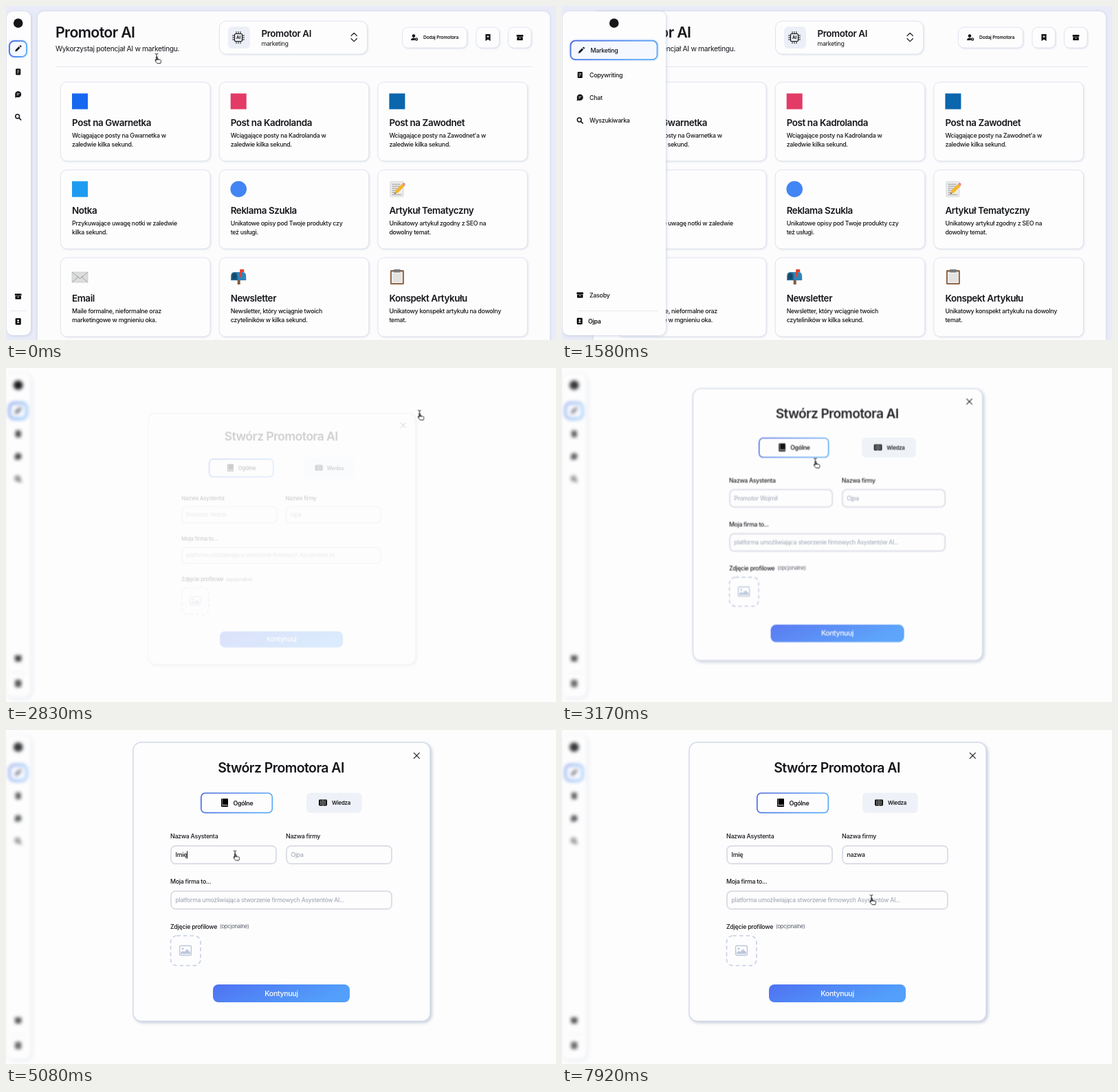
Write an HTML page that moves like this. It is 800 px wide and 487 px high and loops after 8 s.

```html
<!DOCTYPE html>
<html lang="pl">
<head>
<meta charset="utf-8">
<title>Kreator asystenta</title>
<style>
@property --open { syntax: "<number>"; inherits: true; initial-value: 0; }
html, body { margin: 0; width: 100%; height: 100%; overflow: hidden; background: #fdfdfd; }
svg { display: block; width: 100%; height: 100%; }
text { font: 500 8.8px Inter, "Open Sans", sans-serif; letter-spacing: -.03em; fill: #15161a; }
.h1 { font-size: 21.3px; font-weight: 600; }
.h2 { font-size: 19.5px; font-weight: 600; }
.h3 { font-size: 13.4px; font-weight: 600; }
.lead { font-size: 10.3px; font-weight: 400; }
.mid { text-anchor: middle; }
.hint { fill: #9a9fb3; font-weight: 400; }
.line { fill: none; stroke: #15161a; stroke-linecap: round; stroke-linejoin: round; }
.cut { fill: none; stroke: #fff; stroke-width: .8; }
.tile { fill: #fdfdfd; stroke: #e1e4ee; filter: drop-shadow(1px 1.5px 1.2px #b9c0d466); }
.field { fill: #fdfdfd; stroke: #dcdfe7; stroke-width: 2; }

#page, #sidebar, #dialog, #cursor, #cursor > g { animation: 8s linear infinite; }
#page { animation-name: leave; }
@keyframes leave { 0%, 32.2% { opacity: 1; } 35%, 100% { opacity: 0; } }

#sidebar { animation-name: unfold, haze; }
#sidebar .panel { width: calc(35px + 115px * var(--open)); fill: #fdfdfd; filter: drop-shadow(1px 1px 2px #a9b2d088); }
#sidebar .active {
  x: calc(5px + 7.5px * var(--open)); y: calc(51px - .3px * var(--open));
  width: calc(25px + 101px * var(--open)); height: calc(23px + 4.5px * var(--open));
  fill: #f5f8ff; stroke: url(#rim); stroke-width: 1.8; filter: drop-shadow(0 0 1.5px #8db2f5aa);
}
#sidebar .rule { x: calc(7px + 15px * var(--open)); width: calc(23px + 95px * var(--open)); fill: #e6e8f0; }
#sidebar .item { transform: translate(calc(var(--dx) * var(--open)), calc(var(--dy) * var(--open))); }
#sidebar text { opacity: calc(var(--open) * 2 - 1); }
@keyframes unfold {
  0%, 7% { --open: 0; animation-timing-function: ease-out; }
  10.5%, 23.5% { --open: 1; animation-timing-function: ease-in-out; }
  26.5%, 100% { --open: 0; }
}
@keyframes haze {
  0%, 32.2% { filter: blur(0); opacity: 1; }
  35% { filter: blur(2.6px); opacity: 1; }
  39%, 100% { filter: blur(2.8px); opacity: .86; }
}

#dialog { animation-name: rise; transform-origin: 401px 501px; }
#dialog .sheet { fill: #fdfdfe; stroke: #d3dae8; stroke-width: 1.5; filter: drop-shadow(2px 2.5px 2px #a6b0c699); }
@keyframes rise {
  0%, 34.3% { opacity: 0; transform: scale(.885); }
  35.375% { opacity: .19; transform: scale(.9); }
  39.625% { opacity: .93; transform: scale(.975); animation-timing-function: ease-out; }
  42.75%, 100% { opacity: 1; transform: none; }
}

#cursor { animation-name: roam; }
@keyframes roam {
  0%, 1% { transform: translate(219px, 74px); }
  7.5% { transform: translate(24px, 120px); }
  12% { transform: translate(12px, 150px); }
  16%, 21.9% { transform: translate(-20px, 150px); }
  23.8% { transform: translate(60px, 95px); }
  30.4%, 32.2% { transform: translate(622px, 49px); }
  35.375% { transform: translate(602px, 66px); }
  39.625% { transform: translate(368.5px, 136px); }
  43.5%, 68.75% { transform: translate(333px, 180.5px); }
  75.5%, 95.87% { transform: translate(486px, 182px); }
  99%, 100% { transform: translate(450px, 245px); }
}
#cursor > g { animation-timing-function: step-end; }
#arrow { animation-name: arrow; }
#hand { animation-name: hand; }
#beam { animation-name: beam; }
@keyframes arrow { 0%, 37.5% { opacity: 1; } 29.1%, 42.5%, 100% { opacity: 0; } }
@keyframes hand { 0%, 37.5%, 100% { opacity: 0; } 29.1% { opacity: 1; } }
@keyframes beam { 0%, 55%, 81% { opacity: 0; } 42.5%, 68.75%, 95.87%, 100% { opacity: 1; } }
</style>
</head>
<body>
<svg id="stage" viewBox="0 0 800 487"></svg>
<script>
const INK = '#15161a';
const text = (x, y, s, cls = '', attrs = '') => `<text x="${x}" y="${y}" class="${cls}" ${attrs}>${s}</text>`;
const box = (x, y, w, h, r, cls = '', attrs = '') =>
  `<rect x="${x}" y="${y}" width="${w}" height="${h}" rx="${r}" class="${cls}" ${attrs}/>`;
const at = (x, y, s) => `<g transform="translate(${x} ${y})">${s}</g>`;
const fill = (color, d) => `<path d="${d}" fill="${color}"/>`;
const dot = (x, y, r, color = INK) => `<circle cx="${x}" cy="${y}" r="${r}" fill="${color}"/>`;
const stroke = (d, width = 1.2, cls = 'line') => `<path d="${d}" class="${cls}" style="stroke-width:${width}"/>`;

// Icons are centred on 0,0.
const icon = {
  mark: dot(0, 0, 6.8),
  pencil: fill(INK, 'M-4.5 4.5l.8-2.8L.9-2.9l2 2-4.6 4.6zM1.7-3.7l.9-.9q.7-.5 1.3.1l.7.7q.5.6 0 1.2l-.9.9z'),
  doc: box(-3.5, -4.5, 7, 9, 1) + stroke('M-1.8-2h3.6M-1.8 0h3.6M-1.8 2h2', .8, 'cut'),
  chat: dot(0, -.3, 4.5) + fill(INK, 'M-4 0l-.6 4.8L0 3.5z') + stroke('M-2-1.3h4M-2 .6h2.5', .8, 'cut'),
  search: stroke('M1.3 1.3L4 4', 1.7) + '<circle cx="-1" cy="-1" r="2.9" class="line" stroke-width="1.5"/>',
  archive: box(-4.8, -4, 9.6, 2.7, .5) + box(-4.2, -.8, 8.4, 4.9, .7) + stroke('M-1.4 1h2.8', .9, 'cut'),
  contact: box(-4, -4.8, 8, 9.6, 1.2) + dot(0, -1.3, 1.4, '#fff') + fill('#fff', 'M-2.3 2.2q2.3-3.4 4.6 0z'),
  bookmark: fill(INK, 'M-3.6-5h7.2V5L0 2.7-3.6 5z') + stroke('M0-2.8v3M-1.5-1.3h3', 1, 'cut'),
  user: dot(-1, -2.4, 2.3) + fill(INK, 'M-5 4q0-3.6 4-3.6L1 1 .5 4z') +
    '<circle cx="3" cy="2.4" r="1.5" class="line" stroke-width="1.4"/>',
  chip: '<rect x="-5.5" y="-5.5" width="11" height="11" rx="1.6" class="line" stroke-width="1.2"/>' +
    [-3, 0, 3].map(i => stroke(`M${i}-5.5v-3M${i} 5.5v3M-5.5 ${i}h-3M5.5 ${i}h3`, 1)).join('') +
    text(0, 2.2, 'AI', 'mid', 'style="font-size:6.2px;font-weight:700"'),
  book: box(-5, -6, 10, 12, 1) + stroke('M-4 3.6h8.5', .9, 'cut') + stroke('M-3.3-6v9', .5, 'cut'),
  open: box(-6, -4.5, 12, 9, 1.4) + stroke('M0-4v8.5M-4.4-2.2h3M-4.4 0h3M-4.4 2.2h3M1.4-2.2h3M1.4 0h3M1.4 2.2h3', .8, 'cut'),
  image: '<rect x="-8.4" y="-7" width="16.8" height="14" rx="2" fill="none" stroke="#bcc6dc" stroke-width="1.4"/>' +
    dot(-4, -2.8, 1.5, '#bcc6dc') + fill('#bcc6dc', 'M-7 5v-2l3-2.5 2 1.6L2.5-2 7 2.5V5z'),
  memo: box(-10, -11, 19, 22, 1, '', 'fill="#edeeec" stroke="#c9cbca" stroke-width=".7"') +
    stroke('M-7-7H5M-7-4H6M-7-1H3M-7 2H0M-7 5h5M-7 8H6', 1, 'line" stroke-dasharray="3 1" opacity=".45') +
    fill('#f5b52d', 'M-4 7l1.5-5L7-7.5l3.5 3.5L1 5.500z') + fill('#e88d86', 'M7-7.500l1.600-1.500q2-.6 3 1.200.6 1.400-1.100 3.800z') +
    fill('#4a4038', 'M-4 7l.6-2.200 1.600 1.600z'),
  envelope: box(-11.5, -7, 23, 15, 1, '', 'fill="#dcdddd" stroke="#c2c3c4" stroke-width=".7"') +
    stroke('M-11 7.500L-2.500 0M11 7.500L2.500 0M-11-6.500L0 2.500 11-6.500', 1, 'line" opacity=".3'),
  mailbox: box(-1.5, 4, 4, 7, 0, '', 'fill="#8a5939"') +
    fill('#3384b8', 'M-5-7H6q5 0 5 6v6H-5z') + fill('#23648f', 'M-11 5v-6q0-6 5-6t5 6v6z') +
    fill('#174767', 'M-9 3v-4q0-4 3-4t3 4v4z') + fill('#e3402f', 'M2-11h6v4H4v7H2z'),
  clipboard: box(-10, -10, 20, 21, 1.5, '', 'fill="#8f6547"') + box(-8, -7.5, 16, 16.5, .5, '', 'fill="#eeeeec"') +
    stroke('M-6-3H6M-6 0H6M-6 3H6M-6 6H6', .6, 'line" opacity=".25') + box(-5, -11, 10, 4.5, 1, '', 'fill="#777b7e"'),
};
const square = color => box(-11.5, -11.5, 23, 23, 0, '', `fill="${color}"`);

const cards = [
  [square('#1768f0'), 'Post na Gwarnetka', 'Wciągające posty na Gwarnetka w', 'zaledwie kilka sekund.'],
  [square('#e33a66'), 'Post na Kadrolanda', 'Wciągające posty na Kadrolanda w', 'zaledwie kilka sekund.'],
  [square('#0a66ad'), 'Post na Zawodnet', "Wciągające posty na Zawodnet'a w", 'zaledwie kilka sekund.'],
  [square('#1d9bf0'), 'Notka', 'Przykuwające uwagę notki w zaledwie', 'kilka sekund.'],
  [dot(0, 0, 11.8, '#4285f4'), 'Reklama Szukla', 'Unikatowe opisy pod Twoje produkty czy', 'też usługi.'],
  [icon.memo, 'Artykuł Tematyczny', 'Unikatowy artykuł zgodny z SEO na', 'dowolny temat.'],
  [icon.envelope, 'Email', 'Maile formalne, nieformalne oraz', 'marketingowe w mgnieniu oka.'],
  [icon.mailbox, 'Newsletter', 'Newsletter, który wciągnie twoich', 'czyteliników w kilka sekund.'],
  [icon.clipboard, 'Konspekt Artykułu', 'Unikatowy konspekt artykułu na dowolny', 'temat.'],
].map(([art, title, first, second], i) => at(79.5 + i % 3 * 230.7, 111 + Math.floor(i / 3) * 128,
  box(0, 0, 217.5, 115, 9, 'tile') + at(28, 28, art) +
  text(16.5, 64, title, 'h3') + text(16.5, 80.7, first) + text(16.5, 94, second))).join('');

const page = box(0, 0, 800, 487, 0, '', 'fill="#e9ecf8"') +
  box(46, 8, 745, 500, 9, '', 'fill="#fcfcfd" style="filter:drop-shadow(0 0 2px #a9b2d077)"') +
  text(72, 46, 'Promotor AI', 'h1') + text(72, 65.5, 'Wykorzystaj potencjał AI w marketingu.', 'lead') +
  box(310.5, 22, 215, 48, 10, 'tile') + box(323, 30, 32, 32, 6, '', 'fill="#eceff7"') + at(338, 46, icon.chip) +
  text(371.5, 44.5, 'Promotor AI', 'h3') + text(371.5, 57.5, 'marketing', '', 'style="font-weight:400"') +
  stroke('M502 43.500l4.200-4.200 4.200 4.200M502 47.500l4.200 4.200 4.200-4.200', 1.1) +
  box(576.5, 31, 94, 30, 8, 'tile') + at(594, 46, icon.user) +
  text(607, 48.3, 'Dodaj Promotora', '', 'style="font-size:6.7px;font-weight:600"') +
  box(684, 31, 33.5, 30, 8, 'tile') + at(701, 46, icon.bookmark) +
  box(730.5, 31, 33.5, 30, 8, 'tile') + at(747.5, 46, icon.archive) +
  box(72, 88, 693, 1, 0, '', 'fill="#e3e6f0"') + cards;

// icon, collapsed y, shift when unfolded, label
const menu = [
  ['mark', 25, 58, 0, ''], ['pencil', 62, 10.5, 2.5, 'Marketing'], ['doc', 96, 8.5, 4.5, 'Copywriting'],
  ['chat', 129, 8.5, 4.5, 'Chat'], ['search', 162, 8.5, 5, 'Wyszukiwarka'],
  ['archive', 423.5, 8.5, -2, 'Zasoby'], ['contact', 460, 8, -.5, 'Ojpa'],
].map(([name, y, dx, dy, label]) =>
  `<g class="item" style="--dx:${dx}px;--dy:${dy}px">${at(17.7, y, icon[name])}</g>` +
  text(name === 'pencil' ? 41.5 : name === 'contact' ? 38 : 40, y + dy + 3.2, label, '',
    name === 'contact' ? 'style="font-weight:600"' : '')).join('');
const sidebar = box(1, 8, 35, 472, 9, 'panel') + box(5, 51, 25, 23, 7, 'active') + box(7, 444, 23, 1, 0, 'rule') + menu;

const dialog = box(185, 18, 432, 406.5, 12, 'sheet') + stroke('M593.300 33.300l8 8M601.300 33.300l-8 8', 1.1) +
  text(400, 62, 'Stwórz Promotora AI', 'h2 mid') +
  box(283.8, 92, 103.5, 28.7, 6, '', 'fill="#fdfdfe" stroke="url(#rim)" stroke-width="1.7"') + at(318, 106, icon.book) +
  text(330.5, 109.5, 'Ogólne', '', 'style="font-weight:600"') +
  box(437, 91.5, 80.5, 29.5, 6, '', 'fill="#eef1f7"') + at(461, 106, icon.open) +
  text(474, 109.2, 'Wiedza', '', 'style="font-size:7.8px;font-weight:600"') +
  text(239, 158.3, 'Nazwa Asystenta') + text(407, 158.3, 'Nazwa firmy') + text(239, 224, 'Moja firma to...') +
  box(240, 169, 153, 26, 6.5, 'field') + box(408, 169, 153, 26, 6.5, 'field') + box(240, 235, 321, 26, 6.5, 'field') +
  text(246.5, 185.3, '', '', 'id="name"') + text(414.5, 185.3, '', '', 'id="firm"') +
  text(246.5, 251.2, 'platforma umożliwiająca stworzenie firmowych Asystentów AI...', 'hint', 'style="font-size:8.7px"') +
  box(0, 176.5, .9, 11, 0, '', 'id="caret"') +
  text(239, 289.6, 'Zdjęcie profilowe') +
  text(311, 289.3, '(opcjonalne)', '', 'style="font-size:7.7px;font-weight:400;fill:#555a66"') +
  box(239.5, 300, 43.5, 43.5, 9, '', 'fill="none" stroke="#c5cee2" stroke-width="1.6" stroke-dasharray="5.5 4"') +
  at(261, 321.5, icon.image) + box(301, 371, 199, 26, 8, '', 'fill="url(#blue)"') +
  text(400.5, 387.6, 'Kontynuuj', 'mid', 'style="font-size:10.600px;fill:#fff"');

const cursor =
  `<g id="arrow"><path d="M0 0v9l2.100-1.900 1.400 3.200 1.400-.6-1.400-3.100h2.900z" fill="#111" stroke="#fff" stroke-width=".6"/></g>
  <g id="hand"><path d="M-.5 1q0-1.200.9-1.200t1 1.200v2.600l4 .9q1.400.4 1.100 1.800l-.7 3.400H1L-1.800 6.500q-.6-1.200.5-1.300l.8.6z"
    fill="#fff" stroke="#222" stroke-width=".9" stroke-linejoin="round"/></g>
  <g id="beam">${stroke('M-1.900-4.500q1.900 0 1.900 1v7q0 1-1.900 1M1.900-4.500q-1.900 0-1.900 1M0 3.500q0 1 1.900 1', .9)}</g>`;

const gradient = (id, from, to) =>
  `<linearGradient id="${id}" y2=".3"><stop stop-color="${from}"/><stop offset="1" stop-color="${to}"/></linearGradient>`;
const layer = (id, s) => `<g id="${id}">${s}</g>`;
document.getElementById('stage').innerHTML =
  `<defs>${gradient('blue', '#4f72f1', '#52a0fb')}${gradient('rim', '#4a66dc', '#5aaaf8')}</defs>` +
  layer('page', page) + layer('sidebar', sidebar) + layer('dialog', dialog) + layer('cursor', cursor);

const caret = document.getElementById('caret');
const fields = [
  { id: 'name', x: 246.5, value: 'Imię', hint: 'Promotor Wojmił', keys: [4420, 4640, 4820, 5080], focus: 3700, blur: 6200 },
  { id: 'firm', x: 414.5, value: 'nazwa', hint: 'Ojpa', keys: [6500, 6660, 6830, 7000, 7170], focus: 6200, blur: 8000 },
].map(field => ({ ...field, node: document.getElementById(field.id) }));

function type(t) {
  let caretOn = false;
  for (const { node, x, value, hint, keys, focus, blur } of fields) {
    const pressed = keys.filter(key => key <= t);
    const shown = value.slice(0, pressed.length);
    node.textContent = shown || hint;
    node.classList.toggle('hint', !shown);
    if (t < focus || t >= blur) continue;
    caretOn = (t - Math.max(focus, ...pressed)) % 1000 < 500;
    caret.setAttribute('x', x + (shown ? node.getComputedTextLength() : 0));
  }
  caret.style.opacity = caretOn ? 1 : 0;
}

let start;
function frame(now) {
  start ??= now;
  type((now - start) % 8000);
  requestAnimationFrame(frame);
}
requestAnimationFrame(frame);
</script>
</body>
</html>
```
